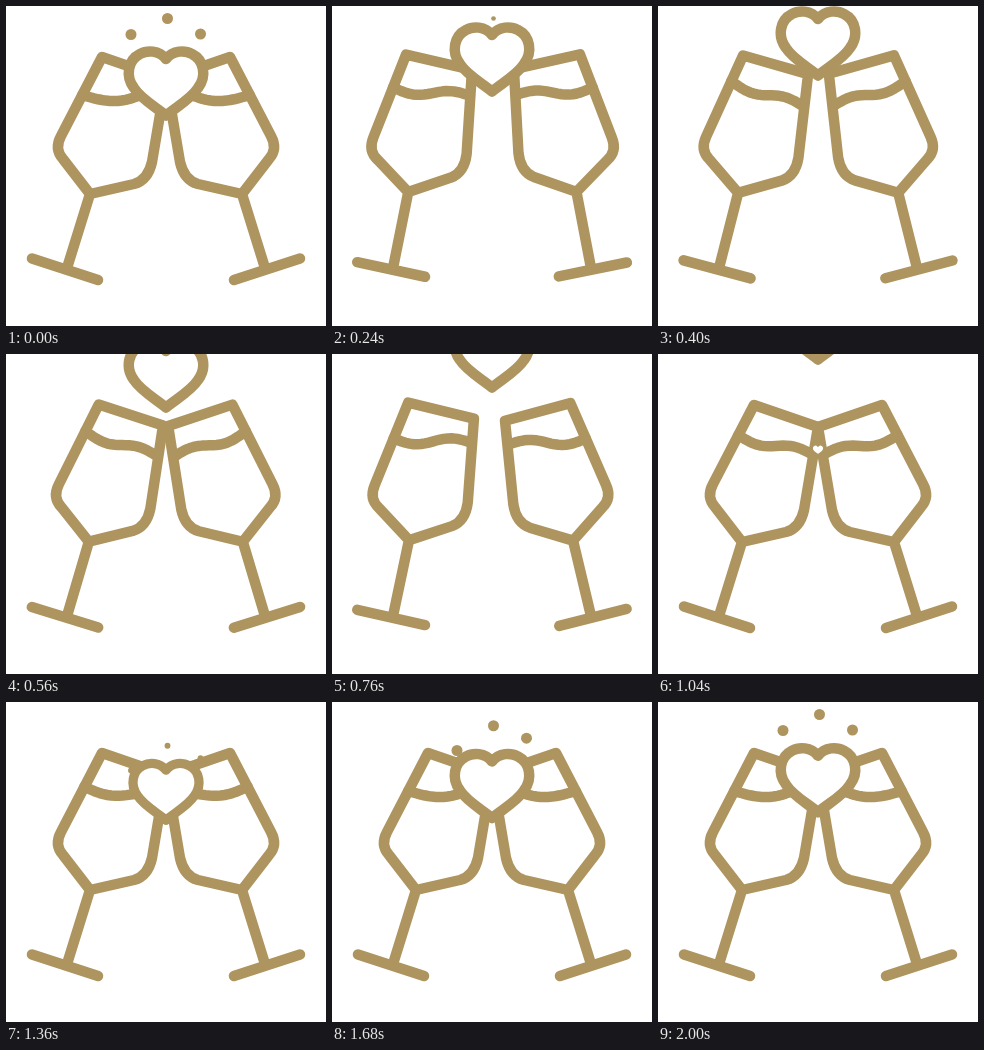
Animation of 320 by 320 pixels, one loop 2.04 s. Source, as an HTML page with a canvas:

```html
<!DOCTYPE html>
<html lang="en">
<head>
<meta charset="utf-8">
<title>Toast</title>
<style>
  html, body { margin: 0; width: 100%; height: 100%; overflow: hidden; background: #fff; }
  canvas { display: block; width: 320px; height: 320px; }
</style>
</head>
<body>
<canvas width="320" height="320"></canvas>
<script>
const ctx = document.querySelector('canvas').getContext('2d');
const GOLD = '#ae9560', LOOP = 2040, STEP = 40, SWING = 520, TAU = Math.PI * 2;

const glass = new Path2D(
  'M26 252.5L92 274M61 262L84 188' +
  'M84 188L57 153Q48 143 55 130L96 51L160 73L146 156Q142 174 128 178Z');
const heart = new Path2D(
  'M160 53C153 44 141 44 134 48C122 54 119 70 128 82C135 93 150 101 160 109.5' +
  'C170 101 185 93 192 82C201 70 198 54 186 48C179 44 167 44 160 53Z');

const clamp = v => Math.min(1, Math.max(0, v));
const ramp = (t, start, length) => clamp((t - start) / length);

// Two swings away from the toast and back, each with its own reach in degrees
function swing(t, first, second) {
  if (t > 2 * SWING) return 0;
  const reach = t < SWING ? first : second;
  return -reach * (1 - Math.abs(2 * (t % SWING) / SWING - 1));
}

// Wine height at u = 0..1 across the glass: a tilted wave that settles into a sag
function surface(u, t) {
  const wave = t < 1000 ? ramp(t, 0, 260) : 1 - ramp(t, 1040, 520);
  const calm = 1 - wave;
  const tilt = wave * (20 + 11 * Math.sin(TAU * (t - 260) / 780)) - 11 * calm;
  return 91 - 7.5 * calm + tilt * (u - 0.5) +
    4 * wave * Math.sin(TAU * u) + (1 + 10 * calm) * Math.sin(Math.PI * u);
}

function drawWine(t) {
  const left = 96 - (surface(0, t) - 51) * 0.52, width = 155 - left;
  ctx.beginPath();
  for (let u = 0; u <= 1; u += 0.05) ctx.lineTo(left + width * u, surface(u, t));
  ctx.stroke();
}

function drawGlass(angle, t) {
  ctx.save();
  ctx.translate(61, 262);
  ctx.rotate(angle * Math.PI / 180);
  ctx.translate(-61, -262);
  drawWine(t);
  ctx.stroke(glass);
  ctx.restore();
}

function drawHeart(dy, size) {
  ctx.save();
  ctx.translate(160, 78 + dy);
  ctx.scale(size, size);
  ctx.translate(-160, -78);
  ctx.fillStyle = '#fff';
  ctx.fill(heart);
  ctx.stroke(heart);
  ctx.restore();
}

// Shrinks in place, then grows again while rising to rest at the arrival time
function drawDot(x, y, arrival, t) {
  const leaving = t < 1000;
  const size = leaving ? 1 - ramp(t, 0, 420) : ramp(t, 1200, 300);
  const drop = leaving ? 0 : Math.max(0, arrival - t) / 16;
  ctx.fillStyle = GOLD;
  ctx.beginPath();
  ctx.arc(x, y + drop, 5.5 * size, 0, TAU);
  ctx.fill();
}

function draw() {
  const t = Math.floor(performance.now() % LOOP / STEP) * STEP;
  ctx.fillStyle = '#fff';
  ctx.fillRect(0, 0, 320, 320);
  ctx.strokeStyle = GOLD;
  ctx.lineWidth = 10.5;
  ctx.lineCap = ctx.lineJoin = 'round';

  drawGlass(swing(t, 6.4, 5.8), t);
  ctx.save();
  ctx.translate(320, 0);
  ctx.scale(-1, 1);
  drawGlass(swing(t, 7, 4.2), t);
  ctx.restore();

  drawDot(125, 28.5, 2000, t);
  drawDot(161.5, 12.5, 1860, t);
  drawDot(194.5, 28, 1810, t);
  if (t < 1160) drawHeart(-0.1 * t, 1);
  if (t > 970) drawHeart((LOOP - t) * 0.018, ramp(t, 970, 440));
  requestAnimationFrame(draw);
}
draw();
</script>
</body>
</html>
```
